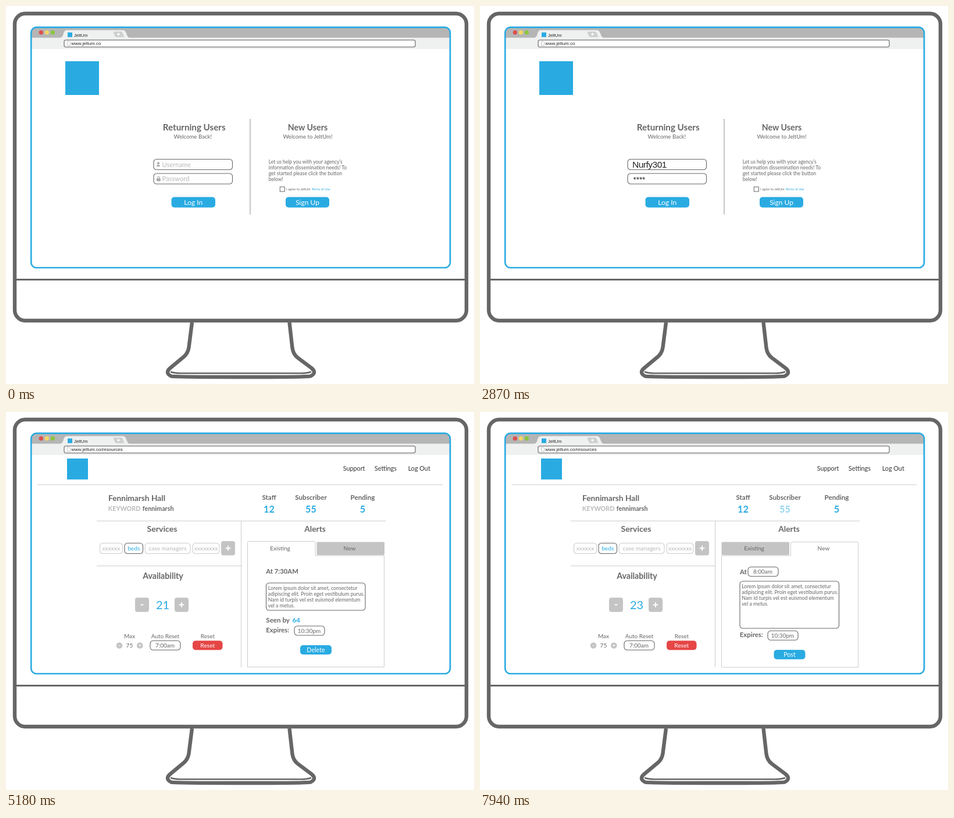
Animation of 805 by 650 pixels, one loop 8 s. Source, as an HTML page:

```html
<!DOCTYPE html>
<html lang="en">
<head>
<meta charset="utf-8">
<title>Sign in and update availability</title>
<style>
html, body { margin: 0; width: 100%; height: 100%; overflow: hidden; background: #fff; }
svg { display: block; width: 805px; height: 650px; }
text { font-family: Lato, sans-serif; fill: #666; }
.sans { font-family: "Liberation Sans", Arial, sans-serif; fill: #222; }
.bold { font-weight: 700; }
.mid { text-anchor: middle; }
.blue { fill: #29abe2; }
.white { fill: #fff; }
.pale { fill: #b8b8b8; }
.dark { fill: #333; }
</style>
</head>
<body>
<svg id="stage" viewBox="0 0 805 650"></svg>
<script>
const BLUE = '#29abe2', GREY = '#666', SILVER = '#c4c4c4', RED = '#e64646';
const LOOP = 8000;

const text = (str, x, y, size, cls = '', id = '') =>
  `<text ${id && `id="${id}"`} x="${x}" y="${y}" font-size="${size}" class="${cls}">${str}</text>`;
const mid = (str, x, y, size, cls = '', id) => text(str, x, y, size, 'mid ' + cls, id);
const lines = (rows, x, y, step, size) =>
  rows.map((row, i) => text(row, x, y + i * step, size)).join('');
const rect = (x, y, w, h, r, fill, stroke = 'none', width = 1) =>
  `<rect x="${x}" y="${y}" width="${w}" height="${h}" rx="${r}" fill="${fill}" stroke="${stroke}" stroke-width="${width}"/>`;
const path = (d, stroke, width = 1, fill = 'none') =>
  `<path d="${d}" stroke="${stroke}" stroke-width="${width}" fill="${fill}"/>`;
const dot = (x, y, r, fill) => `<circle cx="${x}" cy="${y}" r="${r}" fill="${fill}"/>`;
const group = (id, ...parts) => `<g id="${id}">${parts.join('')}</g>`;

const field = (x, y, w, h, stroke = GREY) => rect(x, y, w, h, 5, '#fff', stroke, 1.1);
const timeField = (str, x, y) => field(x, y, 52, 16) + mid(str, x + 25.5, y + 11.8, 10);
const button = (str, x, y, w, h, size, fill = BLUE) =>
  rect(x, y, w, h, 5, fill) + mid(str, x + w / 2, y + h / 2 + size * .36, size, 'white');
const sign = (x, y, half, plus, width) =>
  path(`M${x - half} ${y}h${half * 2}` + (plus ? `M${x} ${y - half}v${half * 2}` : ''), '#fff', width);
const squareButton = (x, y, plus) =>
  rect(x, y, 24, 24.5, 4, SILVER) + sign(x + 12, y + 12.3, plus ? 4.3 : 2.4, plus, 2);
const roundButton = (x, plus) => dot(x, 401.5, 5.3, SILVER) + sign(x, 401.5, plus ? 2 : 1.4, plus, 1);
const chip = (str, x, w, stroke = '#ccc', cls = 'pale') =>
  field(x, 225.5, w, 18, stroke) + mid(str, x + w / 2, 237.7, 10.2, cls);

const monitor = [
  rect(15, 13, 777, 528, 18, '#fff', GREY, 6.4),
  path('M18 470.5H789', GREY, 3),
  path('M320 544L314.5 587Q313 597 306 603L282 623Q273 631 284 636.5Q289 638 404 638Q519 638 524 636.5Q535 631 526 623L502 605Q494 599 492.500 588L487.500 544', GREY, 6.4),
  path('M283 629Q290 631.5 300 631.500H508Q518 631.500 525 629', GREY, 2.5),
].join('');

const browser = [
  rect(43.5, 37, 720.5, 413, 9, '#fff'),
  path('M44 55V46Q44 37 53 37H755Q764 37 764 46V55Z', 'none', 0, '#b5b5b5'),
  rect(44, 54.5, 720, 19.5, 0, '#eff0f0'),
  path('M93 55Q97 54 98.500 49Q100 41.500 104 41.500H201Q205 41.500 207 47Q209 54 213 55Z', 'none', 0, '#eff0f0'),
  path('M186 44H198Q200 44 201 47L203.500 53.500H190Q188 53.500 187 51L184.500 45Q184.500 44 186 44Z', 'none', 0, '#cfcfcf'),
  sign(193.5, 48.5, 2.5, true, 1.3),
  dot(60.3, 45.5, 3.7, '#dd5050'), dot(70.3, 45.5, 3.7, '#f3d768'), dot(80.3, 45.5, 3.7, '#8cc540'),
  rect(106, 45.5, 8, 8, 0, BLUE),
  text('JeltUm', 117, 53.3, 7.6, 'sans'),
  rect(100, 58.5, 604, 12, 3, '#fff', '#888', 1.5),
  path('M105.500 60.800H108.800L110.500 62.500V67.800H105.500Z', '#aaa', .7),
  text('', 112.3, 67.2, 8, 'sans', 'url'),
  rect(43.2, 36.7, 720.8, 413.3, 9, 'none', BLUE, 2.7),
].join('');

const userHint = group('userHint',
  dot(262, 270.3, 2.1, '#aaa'),
  path('M259 276Q259 273 262 273Q265 273 265 276Z', 'none', 0, '#aaa'),
  text('Username', 268.5, 277, 11.2, 'pale'));
const passHint = group('passHint',
  rect(259, 296.3, 6.8, 5, 1, '#aaa'),
  path('M260.500 297V295.500Q260.500 293.300 262.400 293.300Q264.300 293.300 264.300 295.500V297', '#aaa', 1.1),
  text('Password', 268.5, 301.3, 11.2, 'pale'));

const login = group('login',
  rect(102, 95, 58, 58, 0, BLUE),
  mid('Returning Users', 323.7, 213.7, 15.2, 'bold'),
  mid('Welcome Back!', 321.3, 228, 9.7),
  field(254, 263.5, 135.5, 18), field(254, 288, 135.5, 18),
  userHint, passHint,
  '<g letter-spacing="-0.5">', text('', 262, 278, 15.5, 'sans', 'user'), '</g>',
  text('', 263.6, 303.3, 13.3, 'sans', 'pass'),
  group('loginButton', button('Log In', 284.5, 328.5, 75.5, 18, 12.1)),
  path('M420 194V358.500', '#b3b3b3', 1.5),
  mid('New Users', 519, 213.7, 14.2, 'bold'),
  mid('Welcome to JeltUm!', 519, 228, 9.6),
  lines(['Let us help you with your agency’s', 'information dissemination needs! To',
    'get started please click the button', 'below!'], 451.7, 271, 10, 8.5),
  rect(471.3, 311, 8, 8, 0, '#fff', GREY),
  text('I agree to JeltUm', 482, 317, 5.6),
  text('Terms of Use', 525.7, 317, 5.6, 'blue'),
  button('Sign Up', 481, 328.5, 75, 18, 12));

const lorem = ['Lorem ipsum dolor sit amet, consectetur', 'adipiscing elit. Proin eget vestibulum purus.',
  'Nam id turpis vel est euismod elementum', 'vel a metus.'];
const tabs = (outline, greyX) =>
  path(outline, '#ccc') + rect(greyX, 223.5, 116.5, 22.5, 2, SILVER) +
  mid('Existing', 471.5, 237.6, 10.1) + mid('New', 591, 237.9, 10.1);

const existing = group('existing',
  tabs('M532 247H650.500V438.500H415.500V225Q415.500 222.500 418 222.500H529.500Q532 222.500 532 225Z', 534.5),
  text('At 7:30AM', 447.3, 278, 11.3, 'bold'),
  field(447.5, 294, 170.5, 47),
  lines(lorem, 450.8, 305.5, 10.2, 8.75),
  text('Seen by', 447.3, 362, 11.6, 'bold'), text('64', 492.6, 362, 11.6, 'bold blue'),
  text('Expires:', 447.3, 378.7, 11.4, 'bold'),
  timeField('10:30pm', 496, 368),
  button('Delete', 506, 401, 54, 16, 10.7));

const fresh = group('fresh',
  tabs('M534.500 247V226Q534.500 223.500 537 223.500H648Q650.500 223.500 650.500 226V439H415.500V247Z', 415.5),
  text('At', 447, 279, 11.3, 'bold'),
  timeField('8:00am', 461, 266.5),
  field(447, 291, 170.5, 81),
  lines(lorem, 450.2, 302.5, 10.2, 8.75),
  text('Expires:', 446.8, 387.3, 11.4, 'bold'),
  timeField('10:30pm', 495, 376.3),
  button('Post', 505.5, 409, 54, 16.2, 10.7));

const stat = (label, value, x, id) =>
  mid(label, x, 151.3, 11.6, 'bold') + mid(value, x, 172.7, 16.2, 'bold blue', id);

const dashboard = group('dashboard',
  rect(105, 80, 36, 36, 0, BLUE),
  text('Support', 579.7, 101.3, 10.8, 'dark'),
  text('Settings', 633.8, 101.3, 10.9, 'dark'),
  text('Log Out', 691.7, 100.5, 10.8, 'dark'),
  path('M54 125H751M156 187.300H653M404.500 187V438.500M156 264.700H404.500', '#ccc'),
  text('Fennimarsh Hall', 176, 153.2, 13.7, 'bold'),
  text('KEYWORD', 175.8, 170.2, 10.8, 'bold pale'),
  text('fennimarsh', 234.7, 170.2, 10.8, 'bold'),
  stat('Staff', 12, 452.5), stat('Subscriber', 55, 524.5, 'subscribers'), stat('Pending', 5, 613.5),
  mid('Services', 268.5, 205.5, 14.1, 'bold'),
  mid('Alerts', 531.5, 205.5, 13.8, 'bold'),
  chip('xxxxxx', 161.5, 39), chip('beds', 204, 31.5, GREY, 'blue'),
  chip('case managers', 239, 78), chip('xxxxxxxx', 321, 46),
  squareButton(370, 222, true),
  mid('Availability', 270, 287, 14.2, 'bold'),
  squareButton(222, 319.2, false),
  group('plus', squareButton(290, 319.2, true)),
  mid('', 269.5, 338.6, 20, 'blue', 'count'),
  mid('Max', 212.5, 389, 10), mid('Auto Reset', 274, 389, 10), mid('Reset', 347, 389, 10),
  roundButton(195, false), mid('75', 212.5, 405.2, 10.2), roundButton(230.3, true),
  timeField('7:00am', 248, 393.3),
  button('Reset', 321, 393.3, 51.5, 16, 10.2, RED),
  existing, fresh);

document.getElementById('stage').innerHTML = monitor + browser + login + dashboard;

const el = id => document.getElementById(id);
const show = (id, on) => el(id).setAttribute('display', on ? 'inline' : 'none');
const fade = (id, on) => el(id).setAttribute('opacity', on ? .5 : 1);
const write = (id, str) => { if (el(id).textContent !== str) el(id).textContent = str; };
const typed = (str, start, t) => str.slice(0, Math.max(0, Math.floor((t - start) / 170) + 1));
const within = (t, from, to) => t >= from && t < to;

function draw(t) {
  const loggedIn = t >= 4050;
  show('login', !loggedIn);
  show('dashboard', loggedIn);
  write('url', 'www.jeltum.co' + (loggedIn ? '/resources' : ''));

  show('userHint', t < 1000);
  show('passHint', t < 2360);
  write('user', typed('Nurfy301', 1000, t));
  write('pass', typed('*******', 2360, t));
  fade('loginButton', within(t, 3550, 3880));

  fade('plus', within(t, 4850, 5180) || within(t, 5650, 5980));
  write('count', String(21 + (t >= 5280) + (t >= 5980)));
  show('existing', t < 7210);
  show('fresh', t >= 7210);
  fade('subscribers', t >= 7940);
}

const start = performance.now();
function tick() {
  draw((performance.now() - start) % LOOP);
  requestAnimationFrame(tick);
}
tick();
</script>
</body>
</html>
```
